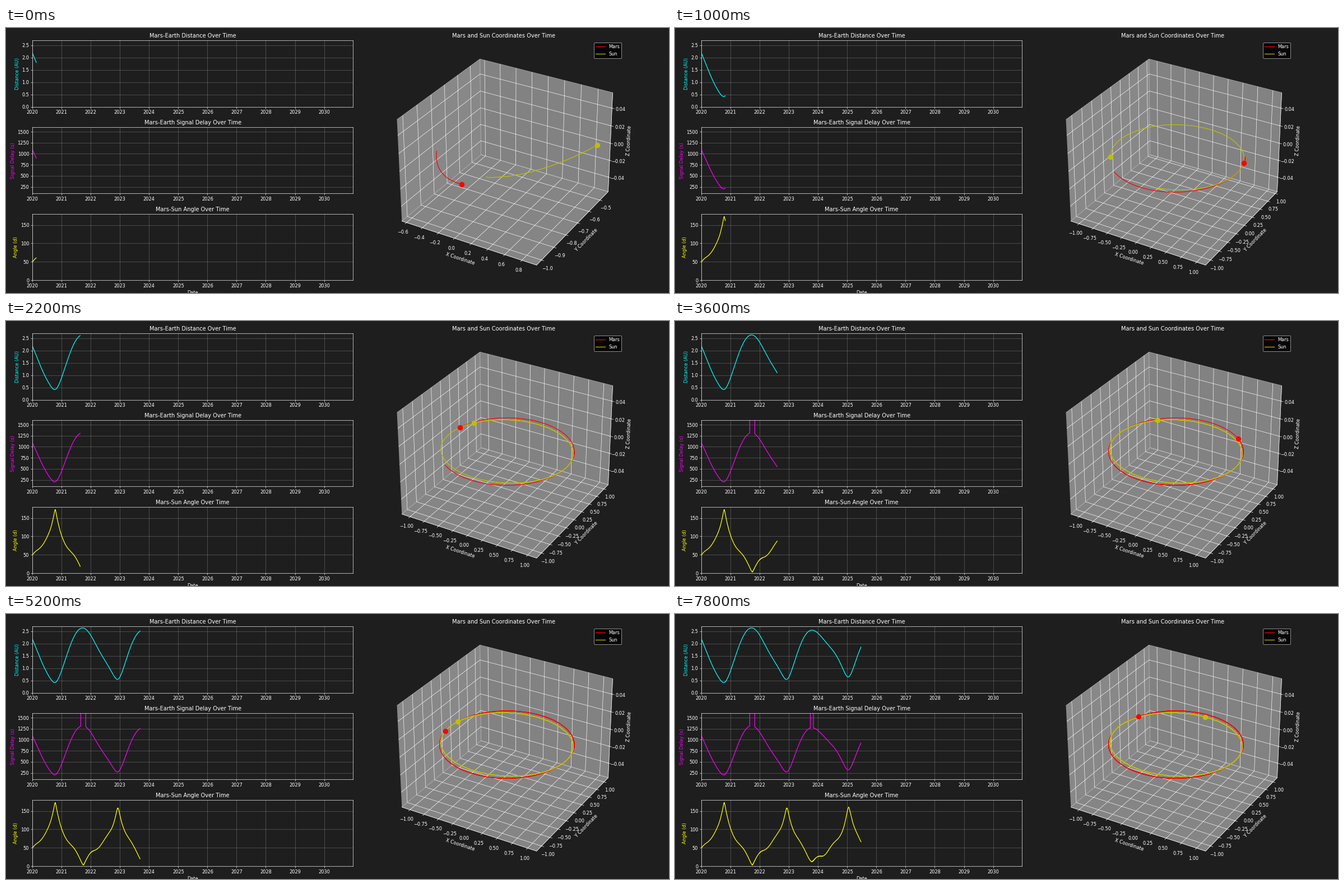
A matplotlib script for the animation above (8 s loop, 1183 by 473 pixels).

```python
import numpy as np
import matplotlib.pyplot as plt
from matplotlib.animation import FuncAnimation

W, H, DPI = 1183, 473, 59.15
FRAMES, INTERVAL = 40, 200
DAYS_PER_FRAME = 50
BG = "#1e1e1e"
LIGHT_SECONDS_PER_AU = 499.005
BLACKOUT_ANGLE = 15
BLACKOUT_DELAY = 1e5

# Orbital elements a, e, inclination, mean longitude, perihelion, node
# at J2000, and their change per century.
EARTH = ([1.00000261, 0.01671123, -0.00001531,
          100.46457166, 102.93768193, 0.0],
         [0.00000562, -0.00004392, -0.01294668,
          35999.37244981, 0.32327364, 0.0])
MARS = ([1.52371034, 0.09339410, 1.84969142,
         -4.55343205, -23.94362959, 49.55953891],
        [0.00001847, 0.00007882, -0.00813131,
         19140.30268499, 0.44441088, -0.29257343])


def heliocentric(body, century):
    """Ecliptic position in AU, one column per day."""
    base, rate = (np.array(v)[:, None] for v in body)
    a, e, inc, lon, peri, node = base + rate * century
    inc, lon, peri, node = np.radians([inc, lon, peri, node])
    mean = lon - peri
    ecc = mean + e * np.sin(mean)
    for _ in range(6):
        ecc -= (ecc - e * np.sin(ecc) - mean) / (1 - e * np.cos(ecc))
    u = a * (np.cos(ecc) - e)
    v = a * np.sqrt(1 - e * e) * np.sin(ecc)
    w = peri - node
    p = u * np.cos(w) - v * np.sin(w)
    q = u * np.sin(w) + v * np.cos(w)
    return np.array([p * np.cos(node) - q * np.sin(node) * np.cos(inc),
                     p * np.sin(node) + q * np.cos(node) * np.cos(inc),
                     q * np.sin(inc)])


def sky_position(vec, century):
    """Right ascension and declination in radians, equinox of date."""
    shift = np.radians(1.3969 * century)
    tilt = np.radians(23.4393 - 0.0130 * century)
    x = vec[0] * np.cos(shift) - vec[1] * np.sin(shift)
    y = vec[0] * np.sin(shift) + vec[1] * np.cos(shift)
    z = vec[2]
    ye = y * np.cos(tilt) - z * np.sin(tilt)
    ze = y * np.sin(tilt) + z * np.cos(tilt)
    return np.arctan2(ye, x), np.arctan2(ze, np.hypot(x, ye))


day = np.arange(FRAMES * DAYS_PER_FRAME)
century = (7304.5 + day) / 36525
earth = heliocentric(EARTH, century)
to_mars = heliocentric(MARS, century) - earth
distance = np.linalg.norm(to_mars, axis=0)

mars_ra, _ = sky_position(to_mars, century)
sun_ra, sun_dec = sky_position(-earth, century)
# The Sun's declination only counts in whole degrees, so its path steps.
sun_radius = np.cos(np.radians(np.trunc(np.degrees(sun_dec))))
mars = np.array([np.cos(mars_ra), np.sin(mars_ra), 0 * mars_ra])
sun = np.array([np.cos(sun_ra), np.sin(sun_ra), 0 * sun_ra])
sun *= sun_radius

angle = np.degrees(np.arccos(np.clip((mars * sun).sum(axis=0), -1, 1)))
delay = np.where(angle < BLACKOUT_ANGLE, BLACKOUT_DELAY,
                 distance * LIGHT_SECONDS_PER_AU)

plt.style.use("dark_background")
plt.rcParams.update({"figure.facecolor": BG, "savefig.facecolor": BG,
                     "axes.facecolor": BG, "font.family": "DejaVu Sans"})
fig = plt.figure(figsize=(20, 7.997), dpi=DPI)

years = np.arange(2020, 2031)
year_starts = [(np.datetime64(f"{y}-01-01") - np.datetime64("2020-01-01"))
               .astype(int) for y in years]


def place(left, top, right, bottom, **kw):
    return fig.add_axes([left / W, 1 - bottom / H,
                         (right - left) / W, (bottom - top) / H], **kw)


def chart(top, title, label, color, ylim, ticks):
    ax = place(47, top, 619.4, top + 118.4)
    ax.set_title(title)
    ax.set_ylabel(label, color=color)
    ax.set_xlim(0, 4017)
    ax.set_ylim(*ylim)
    ax.set_xticks(year_starts, [str(y) for y in years])
    ax.set_yticks(ticks)
    ax.grid(True, color="white", alpha=0.3)
    line, = ax.plot([], [], color=color)
    return ax, line


_, distance_line = chart(22.2, "Mars-Earth Distance Over Time",
                         "Distance (AU)", "cyan", (0, 2.7),
                         np.arange(0, 2.6, 0.5))
_, delay_line = chart(177.1, "Mars-Earth Signal Delay Over Time",
                      "Signal Delay (s)", "magenta", (100, 1600),
                      range(250, 1501, 250))
angle_ax, angle_line = chart(331.8, "Mars-Sun Angle Over Time",
                             "Angle (d)", "yellow", (0, 180),
                             range(0, 151, 50))
angle_ax.set_xlabel("Date")

space = place(674, 22.2, 1102, 450.2, projection="3d")
space.set_zmargin(0.05)
space.set_title("Mars and Sun Coordinates Over Time")
space.set_xlabel("X Coordinate")
space.set_ylabel("Y Coordinate")
space.set_zlabel("Z Coordinate")


def trail(path, color, label):
    line, = space.plot(*path[:, :1], color=color, label=label)
    return path, line


def head(path, color):
    dot, = space.plot(*path[:, :1], "o", color=color, ms=10, mew=1.5)
    return path, dot


trails = [trail(mars, "r", "Mars"), trail(sun, "y", "Sun")]
heads = [head(mars, "r"), head(sun, "y")]
space.legend(loc="upper right", facecolor="black",
             labelspacing=0.42, borderaxespad=0.45)


def draw(frame):
    n = (frame + 1) * DAYS_PER_FRAME
    for line, values in ((distance_line, distance), (delay_line, delay),
                         (angle_line, angle)):
        line.set_data(day[:n], values[:n])
    for path, line in trails:
        line.set_data_3d(*path[:, :n])
    for path, dot in heads:
        dot.set_data_3d(*path[:, n - 1:n])
    # Refit the cube to what has been drawn so far.
    space.auto_scale_xyz(*np.hstack([mars[:, :n], sun[:, :n]]), False)
    return []


anim = FuncAnimation(fig, draw, frames=FRAMES, interval=INTERVAL,
                     init_func=lambda: draw(0), repeat=True, blit=False)
plt.show()
```
